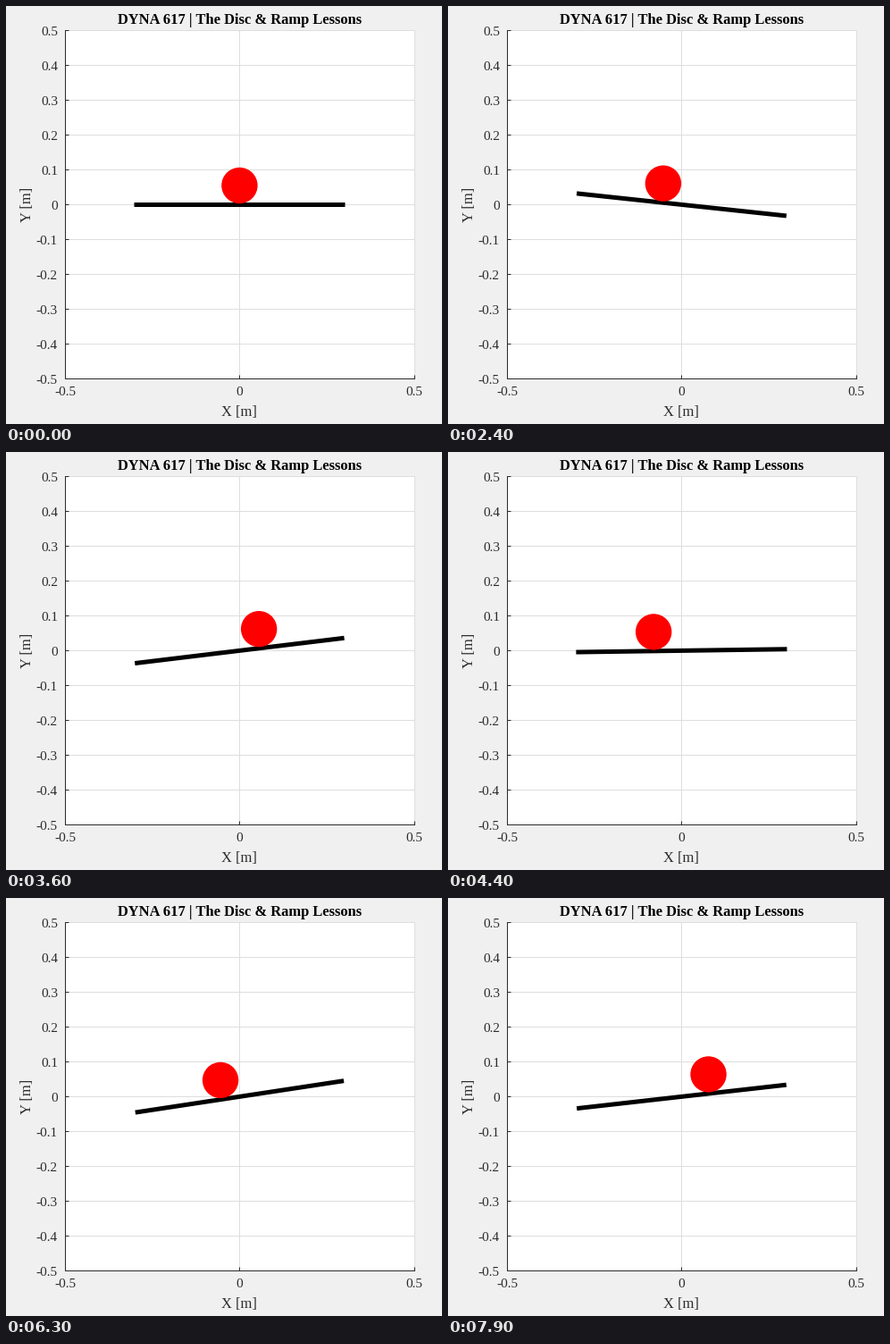
A matplotlib script for the animation above (8 s loop, 488 px wide and 468 px high).

```python
import numpy as np
import matplotlib.pyplot as plt
from matplotlib.animation import FuncAnimation
from matplotlib.patches import Circle
from matplotlib.transforms import ScaledTranslation

W, H, DPI = 488, 468, 100
STEP_MS, FRAMES = 100, 80
LEFT, RIGHT, TOP, BOTTOM = 66, 456.8, 27.4, 417.4
HALF_BEAM, BALL_R, LIFT = 0.302, 0.0517, 0.055
START, OMEGA = 1.7, 2.88
INK, PAPER, GRID = "#2c2c2c", "#f0f0f0", "#dedede"


def px(n):
    """Pixels to points."""
    return n * 72 / DPI


plt.rcParams["font.family"] = "Liberation Serif"
plt.rcParams["axes.unicode_minus"] = False

fig = plt.figure(figsize=(W / DPI, H / DPI), dpi=DPI, facecolor=PAPER)
ax = fig.add_axes([LEFT / W, 1 - BOTTOM / H,
                   (RIGHT - LEFT) / W, (BOTTOM - TOP) / H])
ax.set(xlim=(-0.5, 0.5), ylim=(-0.5, 0.5))
ax.set_axisbelow(True)

xticks = [-0.5, 0, 0.5]
yticks = np.arange(-5, 6) / 10
ax.set_xticks(xticks, [f"{v:g}" for v in xticks])
ax.set_yticks(yticks, [f"{v:g}" for v in yticks])
ax.tick_params(direction="in", length=px(4), width=px(1), pad=px(8),
               color=INK, labelcolor=INK, labelsize=px(15.2))
ax.tick_params(axis="x", pad=px(9))
ax.grid(color=GRID, lw=px(1))
for line in ax.get_xgridlines() + ax.get_ygridlines():
    line.set_clip_on(False)
for side, spine in ax.spines.items():
    spine.set(visible=side in ("left", "bottom"), color=INK, linewidth=px(1))

# Centre the digits optically on their ticks.
nudge = ScaledTranslation(0, -0.7 / DPI, fig.dpi_scale_trans)
for tick in ax.get_yticklabels():
    tick.set_transform(tick.get_transform() + nudge)


def label(x, y, text, **kw):
    fig.text(x / W, 1 - y / H, text, ha="center", va="center",
             fontsize=px(16.5), **kw)


label(261.2, 16, "DYNA 617 | The Disc & Ramp Lessons", weight="bold",
      color="black")
label(261, 455, "X [m]", color=INK)
label(23.5, 222.5, "Y [m]", color=INK, rotation=90)

beam, = ax.plot([], [], color="black", lw=px(5), solid_capstyle="butt",
                zorder=3)
ball = ax.add_patch(Circle((0, LIFT), BALL_R, color="red", lw=0, zorder=4))


def pose(t):
    """Beam angle in radians and ball position in metres."""
    s = t - START
    if s < -1e-6:
        return 0.0, 0.0
    kick = 20.5 * np.exp(-s / 0.31) * np.cos(4 * s)
    angle = (9.2 + 0.42 * s) * np.cos(OMEGA * s) + kick
    reach = (0.0715 + 0.0033 * s) * (1 - np.exp(-s / 0.45))
    return np.radians(angle), -reach * np.sin(OMEGA * s)


def draw(i):
    angle, x = pose(i * STEP_MS / 1000)
    ends = HALF_BEAM * np.array([-1, 1])
    beam.set_data(ends * np.cos(angle), ends * np.sin(angle))
    ball.center = (x, x * np.tan(angle) + LIFT / np.cos(angle))
    return beam, ball


anim = FuncAnimation(fig, draw, frames=FRAMES, interval=STEP_MS,
                     repeat=True, repeat_delay=0)
plt.show()
```
